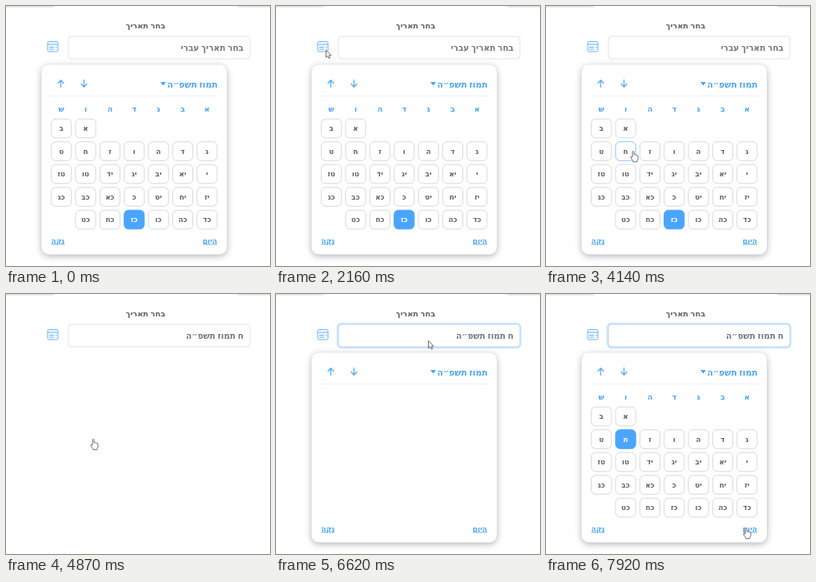
Write an HTML page that moves like this. It is 330 px wide and 325 px high and loops after 8 s.

```html
<!DOCTYPE html>
<html lang="he">
<head>
<meta charset="utf-8">
<title>בחר תאריך</title>
<style>
html, body { margin: 0; width: 100%; height: 100%; overflow: hidden; background: #fff; }
svg { display: block; width: 330px; height: 325px; font-family: "Open Sans", "Noto Sans", "DejaVu Sans", sans-serif; }
.blue { fill: #4ba3f7; }
.line { fill: none; stroke: #5aabf8; stroke-width: 1.3; stroke-linecap: round; stroke-linejoin: round; }
.icon { fill: none; stroke: #6db4f7; }
.bold { font-weight: 700; }
.end { text-anchor: end; }
.mid { text-anchor: middle; }
.cell rect { fill: #fff; stroke: #d8d8d8; }
.cell text { font-size: 8.8px; font-weight: 600; fill: #606060; text-anchor: middle; }
.hover rect { stroke: #8cc3fa; }
.picked rect { fill: #4ba5ff; stroke: #4ba5ff; }
.picked text { fill: #fff; }
#panel > rect { filter: drop-shadow(0 2px 4px rgba(0, 0, 0, .3)); }
#cursor path { fill: #fff; stroke: #5c5c66; stroke-width: .9; stroke-linejoin: round; }
</style>
</head>
<body>
<svg viewBox="0 0 330 325">
  <defs><filter id="soft" x="-20%" y="-200%" width="140%" height="500%"><feGaussianBlur stdDeviation="1.5"/></filter></defs>
  <g fill="#d0d0d0" filter="url(#soft)">
    <rect x="-10" y="-8" width="71" height="9" rx="4"/>
    <rect x="288" y="-8" width="60" height="9" rx="4"/>
  </g>

  <text class="bold mid" x="174.5" y="27.5" font-size="9.8" fill="#5c6066">בחר תאריך</text>
  <rect id="ring" x="77" y="37" width="228.5" height="30" rx="4.5" fill="none" stroke="#d3e6fc" stroke-width="2.4"/>
  <rect id="input" x="78" y="38" width="227" height="28" rx="3.5" fill="#fff"/>
  <text id="value" class="end" x="297" y="55.5" font-size="10.5" font-weight="600" fill="#74787d"></text>

  <g class="icon">
    <rect x="52" y="44.5" width="13" height="12.5" rx="1.5" fill="#f3f9ff"/>
    <path d="M52 48h13M54 51.5h6M54 54h6M62 51.5h1.5"/>
  </g>

  <g id="panel">
    <rect x="44.5" y="73.5" width="231.5" height="237" rx="9" fill="#fff"/>
    <path class="line" d="M68.5 101.5v-8.5M65 96.5l3.5-3.7 3.5 3.7M97.5 92.5v8.5M94 97.5l3.5 3.7 3.5-3.7"/>
    <text class="blue bold end" x="264.5" y="102" font-size="10.7">תמוז תשפ״ה</text>
    <path class="blue" d="M193 95h7l-3.5 4.5z"/>
    <path d="M56 112.5h208.5" stroke="#efefef"/>
    <g id="grid"></g>
    <g class="blue" font-size="9" font-weight="600" text-decoration="underline">
      <text class="end" x="264" y="296.5">היום</text>
      <text x="56.5" y="296.5">נקה</text>
    </g>
  </g>

  <g id="cursor">
    <path id="arrow" d="M.5 .5v9.2l2.1-1.9 1.5 3.3 1.6-.7-1.5-3.2h2.8z"/>
    <path id="hand" d="M-.9 7V.6q0-1 1-1t1 1v3.3q1.1-.6 1.8.3 1.1-.5 1.7.4 1.4-.2 1.4 1.2v2.6q0 1.6-1.2 3.1v1.2H-.2v-1L-2.8 8q-.8-1.3.2-1.7 .8-.2 1.7.7z"/>
  </g>
</svg>
<script>
const LOOP = 8000;
const $ = id => document.getElementById(id);
const clamp = k => Math.max(0, Math.min(1, k));
const progress = (t, from, to) => clamp((t - from) / (to - from));
const show = (el, on) => el.style.display = on ? "" : "none";

function add(parent, tag, attrs, text) {
  const el = document.createElementNS("http://www.w3.org/2000/svg", tag);
  for (const key in attrs) el.setAttribute(key, attrs[key]);
  if (text) el.textContent = text;
  return parent.appendChild(el);
}

function hebrew(n) {
  if (n === 15 || n === 16) return "ט" + "וז"[n - 15];
  return ["", "י", "כ"][Math.floor(n / 10)] + ["", ..."אבגדהוזחט"][n % 10];
}

const colX = c => 251.3 - 30.35 * c;
const rowY = r => 153 + 28.5 * r;

[..."אבגדהוש"].forEach((day, c) =>
  add($("grid"), "text", { x: colX(c), y: 132, class: "blue bold mid", "font-size": 9.5 }, day));

const cells = Array.from({ length: 29 }, (_, i) => {
  const slot = i + 5, x = colX(slot % 7), y = rowY(Math.floor(slot / 7));
  const el = add($("grid"), "g", { class: "cell" });
  add(el, "rect", { x: x - 12.6, y: y - 11.8, width: 25.2, height: 23.6, rx: 5.5 });
  add(el, "text", { x, y: y + 3 }, hebrew(i + 1));
  return { el, x, y, day: i + 1 };
});

// Cursor strokes between resting places
const moves = [
  { from: 120, to: 890, start: [263, 308], end: [35, 116] },
  { from: 890, to: 1420, end: [34, 107] },
  { from: 1690, to: 2300, end: [64, 51] },
  { from: 3360, to: 4140, end: [109, 182] },
  { from: 5810, to: 6400, end: [190, 58] },
  { from: 7360, to: 7900, end: [250, 293] }
];

function cursorAt(t) {
  let pos = moves[0].start;
  for (const { from, to, end } of moves) {
    const k = Math.sin(progress(t, from, to) * Math.PI / 2);
    pos = pos.map((p, i) => p + (end[i] - p) * k);
  }
  return pos;
}

function panelOpacity(t) {
  if (t < 4740) return 1;
  return t < 4870 ? 0.3 : progress(t, 6480, 6620);
}

function draw(t) {
  const [x, y] = cursorAt(t);
  const inside = (cx, cy, w, h) => Math.abs(x - cx) < w && Math.abs(y - cy) < h;
  const opacity = panelOpacity(t);
  const visible = t >= 120, focused = t >= 6460;
  const picked = t < 4210 ? 27 : 8;
  let hand = visible && inside(256, 293, 9, 6) || t >= 4740 && t < 5600;

  for (const { el, x: cx, y: cy, day } of cells) {
    const hit = visible && opacity > 0 && inside(cx, cy, 13, 12);
    hand = hand || hit;
    el.setAttribute("class", "cell" + (hit ? " hover" : "") + (day === picked ? " picked" : ""));
  }

  show($("cursor"), visible);
  show($("hand"), hand);
  show($("arrow"), !hand);
  $("cursor").setAttribute("transform", `translate(${x} ${y})`);

  // The day grid slides in each time the panel opens
  const left = t < 4870 ? 0 : 1 - progress(t, 6620, 7060);
  $("grid").setAttribute("transform", `translate(${36 * left ** 3} 0)`);
  $("grid").style.opacity = 1 - left ** 2;
  $("panel").style.opacity = opacity;

  $("value").textContent = t >= 4740 ? "ח תמוז תשפ״ה" : "בחר תאריך עברי";
  show($("ring"), focused);
  $("input").setAttribute("stroke", focused ? "#b5d5f9" : "#e1e3e6");
}

function tick() {
  draw(performance.now() % LOOP);
  requestAnimationFrame(tick);
}
tick();
</script>
</body>
</html>
```
